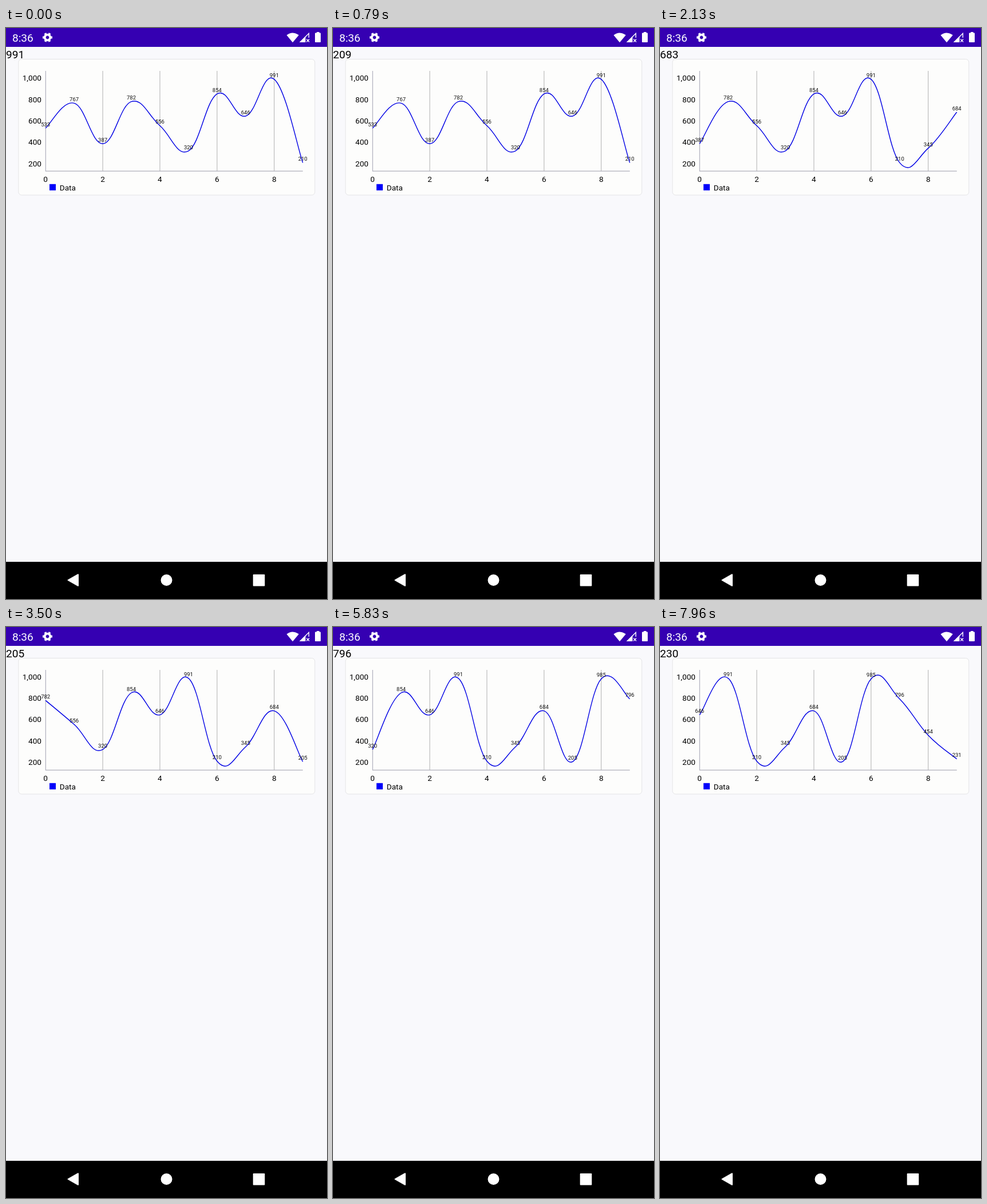
These frames come from a looping animation (561 px wide and 998 px high, 8 s). An HTML page:

```html
<!DOCTYPE html>
<html lang="en">
<head>
<meta charset="utf-8">
<title>Live line chart</title>
<style>
html, body { margin: 0; width: 100%; height: 100%; overflow: hidden; background: #f9f9fc; }
svg { display: block; width: 561px; height: 998px; font: 13.65px Roboto, sans-serif; }
.large { font-size: 19.1px; }
#values { font-size: 9.5px; fill: #111; }
.middle { text-anchor: middle; }
.end { text-anchor: end; }
</style>
</head>
<body>
<svg viewBox="0 0 561 998">
  <rect width="561" height="33" fill="#3500b2"/>
  <g fill="#fff">
    <text class="large" x="11" y="24">8:36</text>
    <g fill="none" stroke="#fff" transform="translate(72.5 16.5)">
      <circle r="4.8" stroke-width="3.8"/>
      <circle r="7" stroke-width="3" pathLength="12" stroke-dasharray="1 1" stroke-dashoffset=".5"/>
    </g>
    <path d="M490.5 12.5Q501 4.5 511.7 12.5L501 25.2Z"/>
    <path d="M513 25L523.500 14.500V25Z"/>
    <path d="M523 24.300H514.500L529.300 9.500V17" fill="none" stroke="#fff" stroke-width="1.4"/>
    <path d="M525.300 19.500L530 24.500M530 19.500L525.300 24.500" stroke="#fff" stroke-width="1.4"/>
    <path d="M543 8.500V7H547.500V8.500H549Q550 8.500 550 9.500V24Q550 25 549 25H541Q540 25 540 24V9.500Q540 8.500 541 8.500Z"/>
  </g>

  <text id="reading" class="large" x="0" y="53"></text>
  <rect x="21.800" y="54.500" width="518" height="237.500" rx="5.500" fill="#fdfdfc" stroke="#e4e4e6"/>
  <g id="grid" stroke="#bcbcbc" stroke-width="1.2"></g>
  <path d="M69.300 75V250.200H518.800" fill="none" stroke="#b0b0bc" stroke-width="1.2"/>
  <g id="xLabels" class="middle"></g>
  <g id="yLabels" class="end"></g>
  <path id="curve" fill="none" stroke="#0000e4" stroke-width="1.4"/>
  <g id="values" class="middle"></g>
  <rect x="76" y="272.800" width="11" height="11" fill="#0000fa"/>
  <text x="93.700" y="283.800">Data</text>

  <rect y="933" width="561" height="65"/>
  <g fill="#fff" stroke="#fff" stroke-linejoin="round" stroke-width="2">
    <path d="M108.500 965L126 955.200V974.800Z"/>
    <circle cx="280.500" cy="965" r="9"/>
    <rect x="432.700" y="956" width="18.600" height="18.500"/>
  </g>
</svg>
<script>
const data = [533, 767, 387, 782, 556, 320, 854, 646, 991, 209.6,
  345, 683.6, 205, 985.2, 796, 454.2, 230.6];
const LOOP = 8000, PERIOD = 1002, POINTS = 10;
const LEFT = 69.2, STEP = 49.94, TOP = 75, BOTTOM = 250;
const $ = id => document.getElementById(id);
const xAt = i => LEFT + i * STEP;
const label = (x, y, text) => `<text x="${x}" y="${y}">${text}</text>`;

for (let i = 0; i < POINTS; i += 2) {
  if (i) $('grid').innerHTML += `<path d="M${xAt(i)} ${TOP}V${BOTTOM}"/>`;
  $('xLabels').innerHTML += label(xAt(i), 268.7, i);
}

// Each tangent spans the neighbouring points, scaled by the smoothing factor.
function smoothPath(ys, smoothing = 0.2) {
  const at = i => Math.max(0, Math.min(POINTS - 1, i));
  const handle = (i, side) => {
    const a = at(i - 1), b = at(i + 1), s = side * smoothing;
    return `${xAt(i) + s * (b - a) * STEP} ${ys[i] + s * (ys[b] - ys[a])}`;
  };
  let d = `M${xAt(0)} ${ys[0]}`;
  for (let i = 1; i < POINTS; i++)
    d += `C${handle(i - 1, 1)} ${handle(i, -1)} ${xAt(i)} ${ys[i]}`;
  return d;
}

function drawChart(start) {
  const visible = data.slice(start, start + POINTS);
  const min = Math.min(...visible), max = Math.max(...visible);
  const margin = (max - min) * 0.1;
  const scale = (BOTTOM - TOP) / (max - min + 2 * margin);
  const yAt = v => BOTTOM - (v - min + margin) * scale;

  $('curve').setAttribute('d', smoothPath(visible.map(yAt)));
  $('values').innerHTML = visible
    .map((v, i) => label(xAt(i), yAt(v) - 3.3, Math.round(v))).join('');
  $('yLabels').innerHTML = [200, 400, 600, 800, 1000]
    .map(v => label(62, yAt(v) + 4.3, v.toLocaleString('en-US'))).join('');
}

let shown = -1;
function frame() {
  const t = performance.now() % LOOP;
  const start = Math.min(7, Math.floor((t + 52) / PERIOD));
  // The reading above the chart refreshes slightly after the curve.
  const latest = Math.floor((t - 10) / PERIOD) + POINTS - 1;
  if (start !== shown) drawChart(shown = start);
  $('reading').textContent = Math.floor(data[latest]);
  requestAnimationFrame(frame);
}
frame();
</script>
</body>
</html>
```
